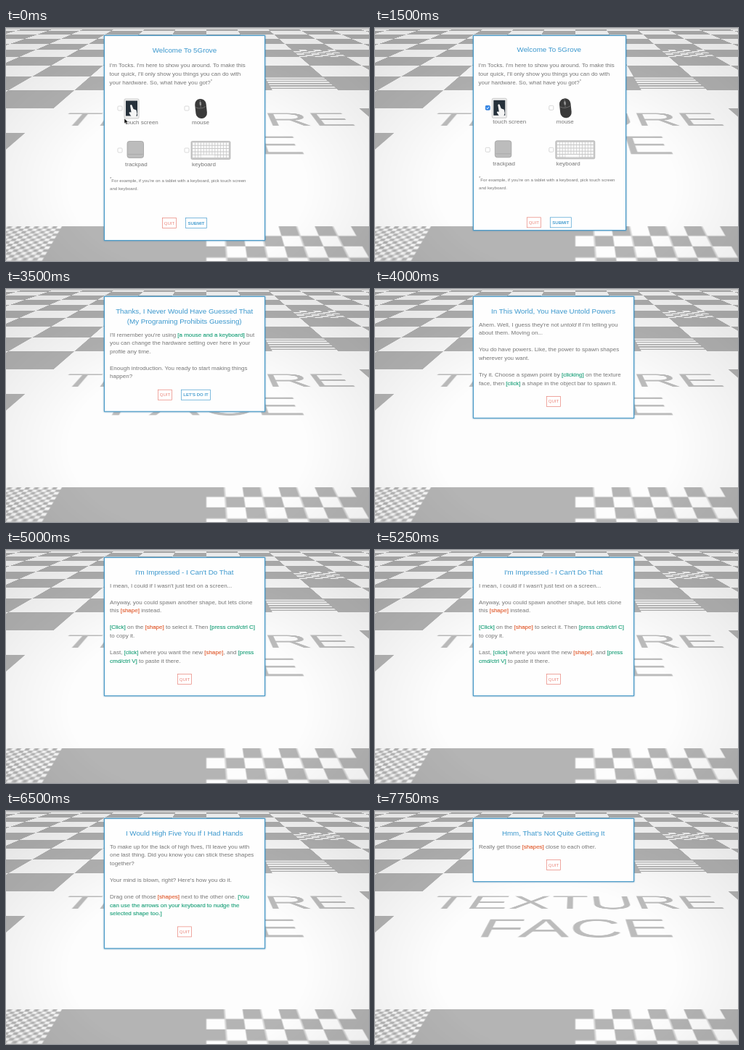
Recreate the animation shown at these times as an HTML page. Size 500 px wide and 322 px high, loop 8 s.

```html
<!DOCTYPE html>
<html lang="en">
<head>
<meta charset="utf-8">
<title>Guided tour</title>
<style>
  html, body { margin: 0; width: 100%; height: 100%; overflow: hidden; background: #dedede; }
  svg { position: absolute; font-family: "Liberation Sans", Arial, sans-serif; }
  #world { position: absolute; inset: 0; overflow: hidden; contain: strict; }
  /* Floor plane: 100 units per tile, origin at the front edge of the face. */
  #floor {
    left: -1000px; top: -1240px; width: 2000px; height: 1340px;
    transform-origin: 1000px 1240px;
    transform: translate(1000px, 1240px) translate(-1000px, -1240px)
      matrix3d(1.99, 0, 0, 0, -.8203, .214, 0, -.002972, 0, 0, 1, 0, 276, 274, 0, 1);
    filter: blur(.5px);
  }
  #shade {
    position: absolute; inset: 0;
    background: radial-gradient(360px 250px at 50% 68%, #0000 45%, #00000018);
  }
  #stage { left: 0; top: 0; width: 100%; height: 100%; }
  .panel { fill: #fefefe; stroke: #4b9bc8; stroke-width: 1.1; filter: drop-shadow(0 .6px 1.3px #4a8db4); }
  .title { font-size: 9.8px; fill: #3a97cd; text-anchor: middle; }
  .body { font-size: 8px; fill: #757575; }
  .note { font-size: 6.15px; fill: #757575; }
  .key { fill: #2aa682; stroke: #2aa682; stroke-width: .2; }
  .shape { fill: #e2663c; stroke: #e2663c; stroke-width: .2; }
  .button { font-size: 6px; text-anchor: middle; }
</style>
</head>
<body>
<div id="world">
  <svg id="floor" viewBox="-1000 -1240 2000 1340"></svg>
  <div id="shade"></div>
  <svg id="stage" viewBox="0 0 500 322"></svg>
</div>
<script>
const LOOP = 8000;
const PITCH = 11.55;
const RED = '#e98278', BLUE = '#4a9fd0';

const rect = (x, y, w, h, attrs) => `<rect x="${x}" y="${y}" width="${w}" height="${h}" ${attrs}/>`;
const text = (x, y, content, type) => `<text class="${type}" x="${x}" y="${y}">${content}</text>`;

function drawFloor() {
  let path = '';
  const block = (x, y, w, h) => path += `M${x} ${y}h${w}v${h}h${-w}z`;
  const checker = (col, row, n) => {
    const s = 100 / n;
    for (let i = 0; i < n; i++)
      for (let j = i % 2; j < n; j += 2)
        block(col * 100 + i * s, -(row + 1) * 100 + j * s, s, s);
  };
  for (let row = -1; row < 13; row++)
    for (let col = -10; col < 10; col++) {
      const onFace = col >= -2 && col < 2 && row >= 0 && row < 4;
      if ((col + row) % 2 === 0 && !onFace) block(col * 100, -(row + 1) * 100, 100, 100);
    }
  checker(-2, -1, 32);
  checker(0, -1, 8);
  checker(2, 7, 6);
  for (let i = 0; i < 6; i++) block(100, -500 + i * 100 / 6, 100, 8);
  const label = (y, word) =>
    `<text y="${y}" font-size="75" text-anchor="middle" fill="#bcbcbc">${word}</text>`;
  return rect(-1000, -1240, 2000, 1340, 'fill="#fdfdfd"') +
    `<path d="${path}" fill="#b4b4b4"/>` + label(-225, 'TEXTURE') + label(-136, 'FACE');
}

const button = (x, y, w, label, color, weight = 'normal') =>
  rect(x + .5, y + .5, w - 1, 14, `fill="#fff" stroke="${color}" stroke-width=".7"`) +
  `<text class="button" x="${x + w / 2}" y="${y + 9.6}" fill="${color}" font-weight="${weight}">${label}</text>`;

const panel = (w, bottom) => rect(135.5, 10.5, w, bottom - 11, 'class="panel"');

// [x] marks an action, {x} a shape, _x_ emphasis.
const markup = s => s
  .replace(/\[.*?\]/g, '<tspan class="key">$&</tspan>')
  .replace(/\{(.*?)\}/g, '<tspan class="shape">[$1]</tspan>')
  .replace(/_(.*?)_/g, '<tspan font-style="italic">$1</tspan>');

function dialog(titles, lines, confirm) {
  const first = 35 + 14 * titles.length;
  const buttonY = first + (lines.length - 1) * PITCH + 18;
  return panel(221, buttonY + 31) +
    titles.map((s, i) => text(245.7, 34 + i * 14, s, 'title')).join('') +
    lines.map((s, i) => text(143, first + 2.7 + i * PITCH, markup(s), 'body')).join('') +
    button(confirm ? 209 : 236, buttonY, 20, 'QUIT', RED) +
    (confirm ? button(241, buttonY, 41, confirm, BLUE, 'bold') : '');
}

function checkbox(x, y, on) {
  return rect(x - 3, y - 3, 6, 6, `rx="1.2" stroke-width=".7" ${on ? 'fill="#2f86ea" stroke="#2f76d0"' : 'fill="#fff" stroke="#c8c8c8"'}`) +
    (on ? `<path d="M${x - 1.6} ${y}l1.2 1.5 2-3" fill="none" stroke="#fff"/>` : '');
}

const touchIcon = x => rect(x, 98, 20, 27, 'rx="1.5" fill="#eee" stroke="#bbb" stroke-width=".7"') +
  rect(x + 2, 100.5, 16, 21, 'fill="#26313b"') +
  `<path d="M${x + 8} 107q1.5-2 2.5 0l2 5 4 1.5 1 5-2 5h-5l-4-6q0-2 3-1z" fill="#f5f5f5"/>`;

const mouseIcon = x => `<g transform="rotate(-6 ${x + 8.5} 111.5)">` +
  rect(x + .8, 98, 15.5, 27, 'rx="7.5" fill="#3a3a3a"') +
  `<path d="M${x + 1.5} 109q7 4 14 0M${x + 8.5} 99v11" fill="none" stroke="#777" stroke-width=".8"/>` +
  rect(x + 7.3, 102, 2.4, 5, 'rx="1.2" fill="#999"') + '</g>';

const trackpadIcon = x => rect(x, 156.5, 22.5, 23, 'rx="3" fill="#bcbcbc" stroke="#a0a0a0" stroke-width=".8"') +
  `<path d="M${x + 1} 174.5h20.5" stroke="#a2a2a2" stroke-width=".7"/>`;

function keyboardIcon(x) {
  let keys = '';
  for (let r = 0; r < 5; r++)
    for (let c = 0; c < 13; c++)
      keys += `M${x + 2 + c * 3.9} ${158.5 + r * 4.3}h3.1v3.3h-3.1z`;
  return rect(x, 156.5, 54, 25, 'rx="1.5" fill="#c8c8c8" stroke="#b0b0b0" stroke-width=".7"') +
    `<path d="${keys}" fill="#fafafa"/>` + rect(x + 13.7, 175.7, 18.7, 3.3, 'fill="#fafafa"');
}

function hardwareForm(narrow, touch, keyboard) {
  const left = narrow ? -1.7 : 0, right = narrow ? -6.2 : 0, up = narrow ? -.7 : 0;
  const star = '<tspan dy="-3" font-size="6">*</tspan>';
  const intro = [
    "I'm Tocks. I'm here to show you around. To make this",
    "tour quick, I'll only show you things you can do with",
    `your hardware. So, what have you got?${star}`
  ];
  return panel(narrow ? 210 : 221, narrow ? 280 : 294) +
    text(246 + right, 34 + up, 'Welcome To 5Grove', 'title') +
    intro.map((s, i) => text(142.5, 54.2 + i * 11.8, s, 'body')).join('') +
    `<g transform="translate(0 ${up})">` +
    checkbox(157 + left, 111, touch) + touchIcon(163 + left) + text(164 + left, 133, 'touch screen', 'body') +
    checkbox(249 + right, 111, false) + mouseIcon(260 + right) + text(256 + right, 133, 'mouse', 'body') +
    checkbox(157 + left, 169, false) + trackpadIcon(167 + left) + text(164 + left, 190.6, 'trackpad', 'body') +
    checkbox(249 + right, 169, keyboard) + keyboardIcon(255 + right) + text(256 + right, 190.6, 'keyboard', 'body') +
    text(143, 212.5, `${star}<tspan dy="3">For example, if you're on a tablet with a keyboard, pick touch screen</tspan>`, 'note') +
    text(143, 224, 'and keyboard.', 'note') +
    button(215 + right, 262, 20, 'QUIT', RED) + button(247 + right, 262, 30, 'SUBMIT', BLUE, 'bold') + '</g>';
}

const cursor = '<path id="cursor" d="M0 0v7l1.7-1.5 1.2 2.7 1.3-.6-1.2-2.6h2.2z" fill="#111" stroke="#fff" stroke-width=".4"/>';

const scenes = [
  [0, hardwareForm(false, false, false) + cursor],
  [1000, hardwareForm(true, true, false)],
  [2000, hardwareForm(true, true, true)],
  [3000, dialog(['Thanks, I Never Would Have Guessed That', '(My Programing Prohibits Guessing)'], [
    "I'll remember you're using [a mouse and a keyboard] but",
    'you can change the hardware setting over here in your',
    'profile any time.', '',
    'Enough introduction. You ready to start making things',
    'happen?'], "LET'S DO IT")],
  [3750, dialog(['In This World, You Have Untold Powers'], [
    "Ahem. Well, I guess they're not _untold_ if I'm telling you",
    'about them. Moving on...', '',
    'You do have powers. Like, the power to spawn shapes',
    'wherever you want.', '',
    'Try it. Choose a spawn point by [clicking] on the texture',
    'face, then [click] a shape in the object bar to spawn it.'])],
  [4750, dialog(["I'm Impressed - I Can't Do That"], [
    "I mean, I could if I wasn't just text on a screen...", '',
    'Anyway, you could spawn another shape, but lets clone',
    'this {shape} instead.', '',
    '[Click] on the {shape} to select it. Then [press cmd/ctrl C]',
    'to copy it.', '',
    'Last, [click] where you want the new {shape}, and <tspan class="key">[press</tspan>',
    '<tspan class="key">cmd/ctrl V]</tspan> to paste it there.'])],
  [6000, dialog(['I Would High Five You If I Had Hands'], [
    "To make up for the lack of high fives, I'll leave you with",
    'one last thing. Did you know you can stick these shapes',
    'together?', '',
    "Your mind is blown, right? Here's how you do it.", '',
    'Drag one of those {shapes} next to the other one. <tspan class="key">[You</tspan>',
    '<tspan class="key">can use the arrows on your keyboard to nudge the</tspan>',
    '<tspan class="key">selected shape too.]</tspan>'])],
  [7250, dialog(["Hmm, That's Not Quite Getting It"], [
    'Really get those {shapes} close to each other.'])]
];

document.getElementById('floor').innerHTML = drawFloor();
const stage = document.getElementById('stage');
stage.innerHTML = scenes.map(([, svg]) => `<g>${svg}</g>`).join('');
const groups = [...stage.children];
const pointer = document.getElementById('cursor');

function render() {
  const t = performance.now() % LOOP;
  const current = scenes.findLastIndex(([start]) => t >= start);
  groups.forEach((g, i) => g.style.display = i === current ? '' : 'none');
  const k = Math.min(1, Math.max(0, (t - 300) / 500));
  const ease = k * k * (3 - 2 * k);
  pointer.setAttribute('transform', `translate(${163 - 6 * ease} ${125 - 14 * ease})`);
  requestAnimationFrame(render);
}
render();
</script>
</body>
</html>
```
